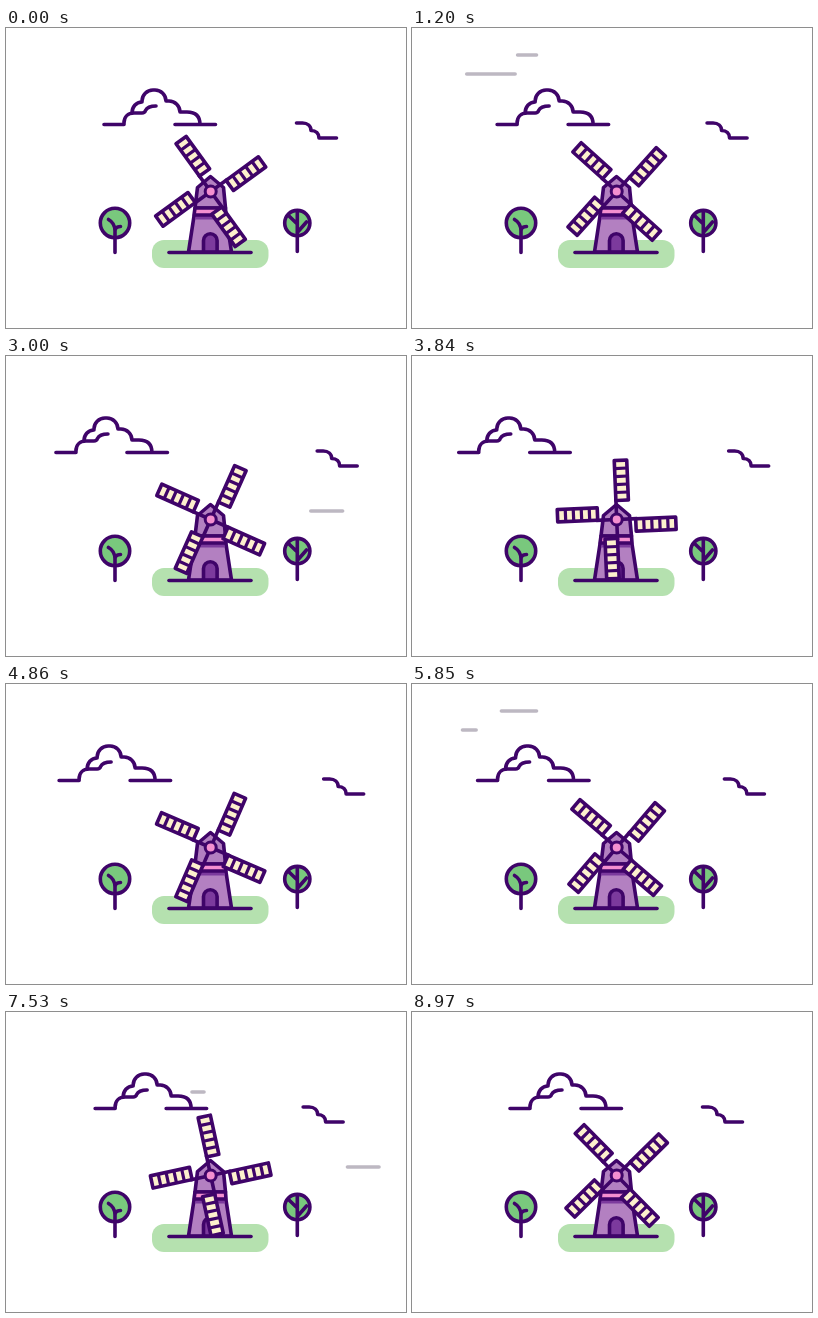
Animation of 400 by 300 pixels, one loop 9030 ms. Source, as an HTML page:

```html
<!DOCTYPE html>
<html lang="en">
<head>
<meta charset="utf-8">
<title>Windmill</title>
<style>
html, body { margin: 0; width: 100%; height: 100%; overflow: hidden; background: #fff }
svg { display: block; width: 100vw; height: 100vh }
</style>
</head>
<body>
<svg viewBox="0 0 400 300" fill="none" stroke="#3f0469" stroke-width="3.6" stroke-linecap="round" stroke-linejoin="round">
  <defs>
    <g id="blade">
      <path d="M0 0V-20"/>
      <path fill="#fdf0cd" d="M0-19V-59H12.500V-19Z"/>
      <path stroke-width="3.200" stroke-linecap="butt" d="M0-27h12.500M0-35h12.500M0-43h12.500M0-51h12.500"/>
    </g>
  </defs>
  <g id="wind" stroke="#bdb8c2"></g>
  <g id="cloud">
    <path d="M98 96.500H118V95C118 89 122 85 128 85H136C138 85 139 84 139.500 82.500C141 79.500 144 78 150 78"/>
    <path d="M126 85c0-6 4-11 10-11v-1c0-6 5-11 11-11h2c6 0 11 5 11 11h3c6 0 11 5 11 11h7c8 0 13 4 13 12.500M169 96.500H209.500"/>
  </g>
  <path id="wisp" d="M290.500 95h6c5 0 8.500 3 8.500 7.500c5 0 8 3 8 7.500H330.500"/>

  <rect x="146" y="212" width="116.500" height="28" rx="12" fill="#b5e1af" stroke="none"/>

  <circle cx="109" cy="195" r="14.700" fill="#79c87d"/>
  <path d="M109 224.500V203C109 196 106 193.500 102.500 191.500M109 203C109 200 111 198.500 114.500 198.500"/>
  <circle cx="291.300" cy="195" r="12.600" fill="#79c87d"/>
  <path d="M291.300 223.500V184M291.300 204.500L300.500 194M291.300 196L283 188"/>

  <path fill="#b380c1" d="M188 188H220L225.500 224H182.500Z"/>
  <path fill="#7c3a9d" stroke="none" d="M189.500 188H218.500L219 191.500H189Z"/>
  <path fill="#b380c1" d="M189 180L191.500 159.500L204.500 148.500L217.500 159.500L219.500 180Z"/>
  <path fill="#f48fd0" d="M189 180H219.500L220 187H188Z"/>
  <path fill="#7c3a9d" d="M197.500 224V212.500a6.800 6.800 0 0 1 13.600 0V224Z"/>
  <path d="M163 224.500H245"/>

  <g id="sails">
    <use href="#blade"/>
    <use href="#blade" transform="rotate(90)"/>
    <use href="#blade" transform="rotate(180)"/>
    <use href="#blade" transform="rotate(270)"/>
  </g>
  <circle cx="204.700" cy="163.500" r="5.500" fill="#f48fd0" stroke-width="3"/>
</svg>
<script>
const LOOP = 9030, STEP = 30, LAST = 8970;
const $ = id => document.getElementById(id);
const clamp = v => Math.min(1, Math.max(0, v));
const sine = p => (1 - Math.cos(Math.PI * clamp(p))) / 2;

// Each gust: height, span, start times, head duration, tail delay and duration.
const gusts = [
  { y: 27, from: 57, to: 124.5, starts: [890, 5600], head: 220, lag: 130, tail: 250 },
  { y: 46, from: 50.5, to: 135, starts: [1119, 5829], head: 130, lag: 70, tail: 220 },
  { y: 49, from: 43, to: 113, starts: [2430, 7140], head: 220, lag: 130, tail: 250 },
  { y: 80, from: 130, to: 198, starts: [2480, 7190], head: 220, lag: 130, tail: 255 },
  { y: 155, from: 280, to: 373, starts: [2860, 7210], head: 230, lag: 18, tail: 457 }
];
for (const g of gusts) {
  g.path = document.createElementNS('http://www.w3.org/2000/svg', 'path');
  $('wind').append(g.path);
}

function blow(g, time) {
  const age = time - g.starts[time < g.starts[1] ? 0 : 1];
  const at = p => g.from + (g.to - g.from) * clamp(p);
  const head = at(age / g.head), tail = at((age - g.lag) / g.tail);
  g.path.setAttribute('d', head > tail ? `M${tail} ${g.y}H${head}` : '');
}

function draw(now) {
  const time = Math.min(Math.floor(now % LOOP / STEP) * STEP, LAST);
  const drift = time < 3600 ? sine(time / 3600) : 1 - sine((time - 3600) / 5400);
  $('cloud').setAttribute('transform', `translate(${-51.5 * drift})`);
  $('wisp').setAttribute('transform', `translate(${13.8 * (1 - Math.cos(time / 9000 * 2 * Math.PI))})`);
  $('sails').setAttribute('transform', `translate(204.7 163.5) rotate(${time * 0.29 - 36})`);
  gusts.forEach(g => blow(g, time));
}

const start = performance.now();
function tick() {
  draw(performance.now() - start);
  requestAnimationFrame(tick);
}
tick();
</script>
</body>
</html>
```
